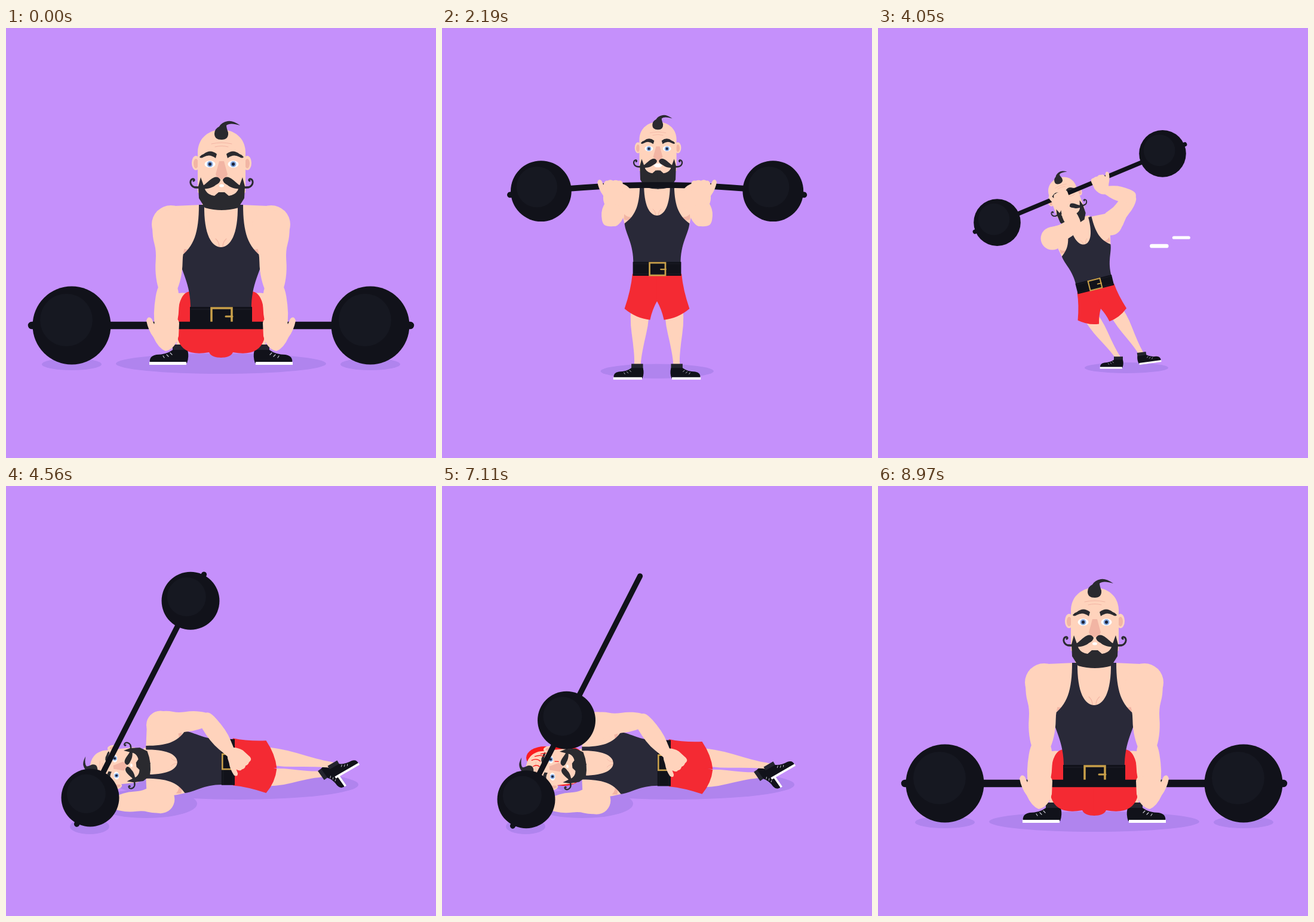
Recreate the animation shown at these times as an HTML page with a canvas. Size 720 by 720 pixels, loop 9 s.

```html
<!DOCTYPE html>
<html lang="en">
<head>
<meta charset="utf-8">
<title>Weightlifter</title>
<style>
html, body { margin: 0; height: 100%; overflow: hidden; background: #c590fb; }
canvas { display: block; }
</style>
</head>
<body>
<canvas id="stage" width="720" height="720"></canvas>
<script>
const ctx = document.getElementById('stage').getContext('2d');
const LOOP = 9000, PAN_START = 8190, PAN_WIDTH = 780, RAD = Math.PI / 180;
const SKIN = '#ffd3bc', SHADE = '#f2b5a4', HAIR = '#2a2a2f', VEST = '#292938', RED = '#f42a33',
  BLACK = '#11121a', GOLD = '#c9a04a', SHADOW = '#b084ee', BLOOD = '#fb1c1f';

const lerp = (a, b, p) => a + (b - a) * p;
const clamp = p => Math.max(0, Math.min(1, p));
const span = (t, a, b) => clamp((t - a) / (b - a));
const smooth = p => p * p * (3 - 2 * p);
const easeIn = p => p * p;
const easeOut = p => p * (2 - p);
const inOut = p => p < .5 ? 2 * p * p : 1 - 2 * (1 - p) ** 2;

// ---------- timeline ----------
// Elbows are in torso space, feet in unrotated body space, the rest on the stage.
const elbows = (x, y) => ({ lex: -x, ley: y, rex: x, rey: y });
const feet = (x, y) => ({ lfx: -x, lfy: y, rfx: x, rfy: y });
const shade = (sx, sy, srx, sry) => ({ sx, sy, srx, sry });

const squat = {
  S: 1, x: 360, y: 497, r: 0, q: 1, k: 0, hx: 1, hr: 0, smile: 0, shut: 0, lie: 0,
  bx: 360, by: 498, ba: 0, bend: 0, slide: 250, grip: 95, free: 0, lfr: 0, rfr: 0,
  ...elbows(89, -59), ...feet(68, 38), ...shade(360, 562, 176, 17)
};
const stand = {
  S: .695, y: 412, q: 0, k: 10, hx: 2, smile: .4, by: 408, bend: 14, grip: 99,
  ...elbows(89, -56), ...feet(28, 206), ...shade(360, 572, 78, 11)
};
const overhead = {
  S: .6, x: 360, y: 434, smile: 1, bx: 360.5, by: 201, bend: -20, grip: 97,
  ...elbows(88, -278), ...feet(43, 206), ...shade(361, 573, 81, 9)
};
const keys = [
  [0, squat],
  [300, { y: 500, bend: 3 }],
  [820, { ...stand, y: 407, by: 401, bend: 22 }, inOut],
  [1000, { y: 413, by: 410, bend: 10 }],
  [1200, stand],
  [1500, { y: 414, by: 412 }],
  [1750, { y: 412, by: 300, bend: 8, ...elbows(102, -72) }],
  [1880, { bend: 15 }],
  [2160, { S: .82, y: 411, by: 282, bend: 18, ...feet(42, 192), ...shade(360, 575, 98, 13) }],
  [2460, { ...overhead, y: 431, by: 184, bend: -6, ...elbows(88, -284) }, easeOut],
  [2640, { y: 436, by: 206, bend: -26 }],
  [2800, overhead],
  [2970, overhead],
  [3240, { bx: 353, ba: -2.5, r: -1, hr: -2, bend: -12 }],
  [3500, { bx: 367, ba: 3, r: 1, hr: 2, bend: -20 }],
  [3720, { bx: 360, ba: -1, r: 0, hr: 0, smile: .4 }],
  [4050, {
    x: 365, y: 438, r: -14, hr: -7, hx: -12, k: 4, smile: 0, shut: 1,
    bx: 338, by: 268, ba: -22.6, bend: 0, grip: 61,
    lex: -13, ley: -189, rex: 159, rey: -226,
    lfx: 63, lfy: 192, rfx: 127, rfy: 180, rfr: -8, ...shade(416, 569, 70, 9)
  }],
  [4520, {
    S: .74, x: 383, y: 464, r: -90, hr: -6, hx: -3, k: 2, lie: 1, shut: 0, free: 1,
    bx: 225, by: 360, ba: -63, lex: -93, ley: -268, rex: 97, rey: -65,
    lfx: 199, lfy: 27, rfx: 223, rfy: 7, lfr: -125, rfr: -30, ...shade(388, 500, 202, 25)
  }, easeIn],
  [4640, { by: 355, y: 461 }, easeOut],
  [4760, { by: 360, y: 464 }, easeIn],
  [5120, { slide: -49 }, easeIn],
  [5220, { slide: -38 }, easeOut],
  [5320, { slide: -49 }, easeIn]
];
let last = {};
const poses = keys.map(([time, change, ease = smooth]) =>
  ({ time, ease, pose: last = { ...last, ...change } }));

function poseAt(t) {
  const i = poses.findIndex(k => k.time > t);
  if (i < 0) return last;
  const a = poses[i - 1], b = poses[i], p = b.ease(span(t, a.time, b.time)), out = {};
  for (const key in a.pose) out[key] = lerp(a.pose[key], b.pose[key], p);
  return out;
}

// ---------- drawing helpers ----------
function at(x, y, deg, draw, flip = 1) {
  ctx.save();
  ctx.translate(x, y);
  ctx.rotate(deg * RAD);
  ctx.scale(flip, 1);
  draw();
  ctx.restore();
}
function fill(d, color) {
  ctx.fillStyle = color;
  ctx.fill(new Path2D(d));
}
function line(d, color, width) {
  ctx.strokeStyle = color;
  ctx.lineWidth = width;
  ctx.lineCap = 'round';
  ctx.stroke(new Path2D(d));
}
function oval(x, y, rx, ry, color) {
  ctx.fillStyle = color;
  ctx.beginPath();
  ctx.ellipse(x, y, Math.max(0, rx), Math.max(0, ry), 0, 0, 7);
  ctx.fill();
}
function box(x, y, w, h, color) {
  ctx.fillStyle = color;
  ctx.fillRect(x, y, w, h);
}
function both(draw) {
  at(0, 0, 0, draw);
  at(0, 0, 0, draw, -1);
}
function turn([x, y], deg) {
  const c = Math.cos(deg * RAD), s = Math.sin(deg * RAD);
  return [x * c - y * s, x * s + y * c];
}
// Rounded limb from a to b; the profile lists [position, half width].
function limb(a, b, profile) {
  const dx = b[0] - a[0], dy = b[1] - a[1], len = Math.hypot(dx, dy);
  const pts = [...profile.map(([u, w]) => [u * len, -w]),
    ...profile.map(([u, w]) => [u * len, w]).reverse()];
  const mid = i => {
    const p = pts[i % pts.length], n = pts[(i + 1) % pts.length];
    return [(p[0] + n[0]) / 2, (p[1] + n[1]) / 2];
  };
  at(...a, Math.atan2(dy, dx) / RAD, () => {
    ctx.beginPath();
    ctx.moveTo(...mid(pts.length - 1));
    pts.forEach((p, i) => ctx.quadraticCurveTo(...p, ...mid(i)));
    ctx.fillStyle = SKIN;
    ctx.fill();
  });
}

const LEG = [[-.1, 18], [.1, 20], [.35, 19], [.62, 12], [.88, 7], [1.04, 7]];
const UPPER = [[-.22, 18], [-.08, 31], [.2, 30], [.42, 22], [.7, 23], [.95, 18], [1.1, 10]];
const FORE = [[-.14, 10], [-.02, 18], [.3, 21], [.6, 20], [.88, 13], [1.06, 9]];

// ---------- parts ----------
function shoe() {
  box(-13, -5, 25, 13, '#23242e');
  fill('M-13 4L12 4Q15 15 11 26L-51 26Q-53 14-40 12Q-24 12-13 4Z', BLACK);
  fill('M-52 24L10 24L10 29L-52 29Z', '#fff');
  line('M-17 9l3 3M-23 12l3 3M-29 14l2 3', '#c9c9d4', 1.2);
}

// When lying, the far leg leans towards the near one.
function shorts(q, lie) {
  const from = [1, -6, -50, -6, -53, -4, -56, 30, -70, 71, -45, 92, -15, 95, -10, 72, 1, 53];
  const to = [1, -56, -40, -56, -50, -56, -78, -56, -72, 25, -62, 54, -20, 46, -16, 55, 1, 55];
  const n = from.map((v, i) => lerp(v, to[i], q));
  const half = () =>
    fill(`M${n[0]} ${n[1]}Q${n.slice(2, 6)}Q${n.slice(6, 10)}Q${n.slice(10, 14)}Q${n.slice(14)}Z`, RED);
  half();
  at(0, 0, 0, () => {
    ctx.transform(1, 0, .3 * lie, 1, 0, 0);
    half();
  }, -1);
}

function torso() {
  fill('M-32-206L-32-201L-78-199Q-82-160-70-112L70-112Q82-160 78-199L32-201L32-206Z', SKIN);
  both(() => {
    fill('M-71-133Q-61-123-49-128Q-56-117-71-121Z', SHADE);
    line('M-3-131Q-3-139-9-144', SHADE, 1.2);
  });
  fill('M-37-201L-28-201C-29-150-15-130 0-130C15-130 29-150 28-201L37-201C37-155 45-130 70-113' +
    'C68-90 50-70 51-25L-51-25C-50-70-68-90-70-113C-45-130-37-155-37-201Z', VEST);
}

function belt() {
  box(-52, -30, 104, 30, BLACK);
  line('M-50-26H50M-50-4H50', '#20212b', 1);
  ctx.strokeStyle = GOLD;
  ctx.lineWidth = 3.5;
  ctx.strokeRect(-16, -28, 34, 27);
  line('M8-14H19', GOLD, 3);
}

function head({ k, smile, shut }, hurt) {
  both(() => {
    oval(-43, -79, 7, 12, SKIN);
    oval(-43, -78, 4, 8, SHADE);
  });
  fill('M-40-30L-40-98C-38-147 38-147 40-98L40-30Q20-8 0-8Q-20-8-40-30Z', SKIN);
  line('M-17-111Q0-115 17-111M-11-106Q0-109 11-106', SHADE, 1);
  fill('M-4-82L4-82L10-60Q7-52 0-52Q-7-52-10-60Z', SHADE);
  both(() => {
    if (shut < .6) {
      oval(-19.5, -77, 9, 6, '#fff');
      oval(-19.5, -77, 5, 5, '#84a9e2');
      oval(-19.5, -77, 2.6, 2.8, '#1c2338');
    } else line('M-28-77Q-20-72-12-77', SHADE, 1.5);
    fill('M-37-89Q-34-93-30-94Q-19-103-8-94L-10-87Q-20-95-30-89Q-35-86-37-89Z', HAIR);
    fill(`M-35-55L-39-40L-38 ${k - 20}L-28 ${k - 4}Q-14 ${k} 1 ${k}L1-30L-5-30L-12-24Q-22-25-27-33Z`, HAIR);
  });
  oval(0, -41, lerp(4, 13, smile), lerp(2.5, 6, smile), '#fff');
  both(() => {
    fill('M-2-51C-9-62-20-50-27-44C-34-38-40-40-46-40C-36-33-18-35-10-42Q-2-46-2-51Z', HAIR);
    line('M-38-38C-53-36-55-50-49-52C-46-53-45-50-47-49', HAIR, 3);
  });
  fill('M-12-128Q-12-118 0-118Q12-118 11-130Q8-138 8-142Q14-147 31-142Q18-151 10-149Q0-147-4-140Q-12-136-12-128Z', HAIR);
  if (hurt > 0) {
    ctx.globalAlpha = hurt;
    line('M22-120Q26-108 18-101M30-112Q33-100 28-92M8-118Q12-110 6-104M34-98L35-86M14-68L13-60', BLOOD, 1.8);
    ctx.globalAlpha = 1;
  }
}

function hand() {
  fill('M-30-8Q-27-17-21-11L-17-2Q-14-13-8-11Q-2-15 4-11Q9-14 15-11Q24-13 25-4L24 18Q18 40 2 43Q-10 38-18 20Q-27 8-30-8Z', SKIN);
}

function ball() {
  oval(0, 0, 65.5, 65.5, BLACK);
  oval(-9, -9, 44, 44, '#161821');
}

function shadows(p, t) {
  oval(p.sx, p.sy, p.srx, p.sry, SHADOW);
  if (p.q > 0) [-250, 250].forEach(x => oval(360 + x, 563, 50 * p.q, 10 * p.q, SHADOW));
  if (p.lie > .5) {
    const w = p.lie * 2 - 1;
    oval(235, 532, 85 * w, 24 * w, SHADOW);
    oval(140, 570, 33 * w, 13 * w, SHADOW);
  }
  const head = easeOut(span(t, 4700, 5500)), side = smooth(span(t, 5600, 7800));
  oval(203, 468, 42 * head, 34 * head, BLOOD);
  oval(172, 455, 31 * head, 19 * head, BLOOD);
  oval(lerp(280, 320, side), 473, 62 * side, 41 * side, BLOOD);
}

function speedLines(t) {
  const p = span(t, 3930, 4230);
  if (p <= 0 || p >= 1) return;
  const grow = Math.sin(p * Math.PI), shift = (.4 - p) * 50;
  line(`M${471 - 13 * grow + shift} 365h${26 * grow}`, '#fff', 7 * grow);
  line(`M${508 - 13 * grow + shift} 351h${26 * grow}`, '#fff', 5.5 * grow);
}

function scene(t) {
  const p = poseAt(t);
  shadows(p, t);
  speedLines(t);
  ctx.save();
  ctx.translate(p.x, p.y);
  ctx.scale(p.S, p.S);

  const sides = [
    { s: -1, lean: 0, foot: [p.lfx, p.lfy], tilt: p.lfr, elbow: [p.lex, p.ley], rest: [-76, -315], palm: p.ba },
    { s: 1, lean: 20 * p.lie, foot: [p.rfx, p.rfy], tilt: p.rfr, elbow: [p.rex, p.rey], rest: [-3, 14], palm: 135 }
  ];
  for (const { s, lean, foot, tilt } of sides) {
    limb(turn([s * lerp(36, 60, p.q) - lean, lerp(60, -45, p.q)], p.r), foot, LEG);
    at(...foot, tilt, shoe, -s);
  }
  at(0, 0, p.r, () => {
    shorts(p.q, p.lie);
    torso();
    belt();
    at(p.hx, -192 - p.k / 2, p.hr, () => head(p, span(t, 4650, 5300)));
  });

  const mid = [(p.bx - p.x) / p.S, (p.by - p.y) / p.S];
  const onBar = u => {
    const [x, y] = turn([u, p.bend * (u / 250) ** 2], p.ba);
    return [mid[0] + x, mid[1] + y];
  };
  const tip = p.bend * 1.608;
  at(...mid, p.ba, () => line(`M-317 ${tip}Q0 ${-tip} 317 ${tip}`, BLACK, 12.5));

  for (const { s, elbow, rest, palm } of sides) {
    const shoulder = turn([s * 84, -168], p.r), joint = turn(elbow, p.r);
    const held = onBar(s * p.grip), loose = turn(rest, p.r);
    const grip = held.map((v, i) => lerp(v, loose[i], p.free));
    const angle = lerp(p.ba, palm, p.free), w = turn([0, 30], angle);
    oval(...shoulder, 32, 32, SKIN);
    limb(shoulder, joint, UPPER);
    limb(joint, [grip[0] + w[0], grip[1] + w[1]], FORE);
    at(...grip, angle, hand, -s);
  }
  at(...onBar(-250), 0, ball);
  at(...onBar(p.slide), 0, ball);
  ctx.restore();
}

function frame() {
  const t = performance.now() % LOOP;
  const pan = PAN_WIDTH * inOut(span(t, PAN_START, LOOP));
  box(0, 0, 720, 720, '#c590fb');
  at(-pan, 0, 0, () => scene(t));
  if (pan > 0) at(PAN_WIDTH - pan, 0, 0, () => scene(0));
  requestAnimationFrame(frame);
}
frame();
</script>
</body>
</html>
```
